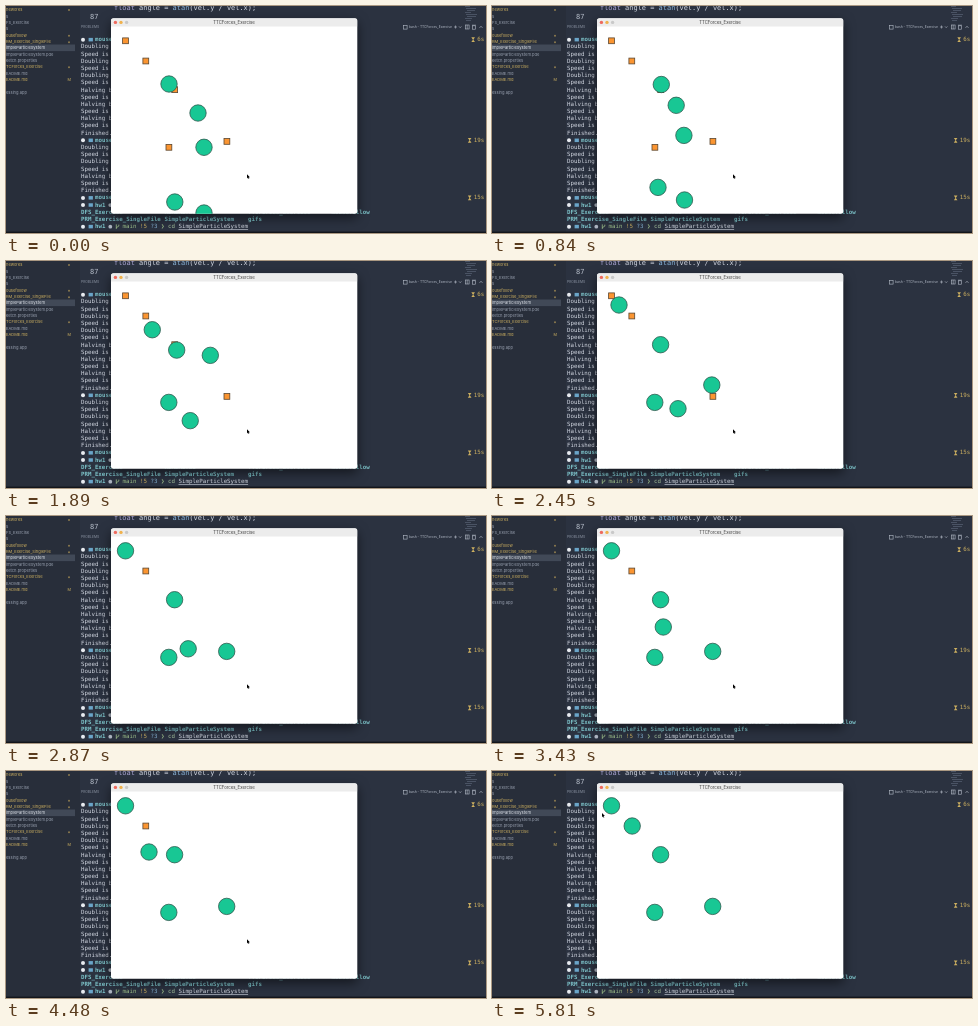
Write an HTML page with a canvas that moves like this. It is 480 by 227 pixels and loops after 5880 ms.

```html
<!DOCTYPE html>
<html lang="en">
<head>
<meta charset="utf-8">
<title>Particles</title>
<style>
html, body { margin: 0; width: 100%; height: 100%; overflow: hidden; background: #2b3240; }
canvas { display: block; width: 480px; height: 227px; }
</style>
</head>
<body>
<canvas id="stage" width="480" height="227"></canvas>
<script>
const W = 480, H = 227, LOOP = 5880, STEP = 70;
const MONO = '"DejaVu Sans Mono", monospace';
const SANS = 'Inter, "Open Sans", sans-serif';
const WIN = { x: 105, y: 12.3, w: 246.3, h: 195.4, bar: 8.2 };
const INK = '#d3d8e2', DIM = '#99a1b0', CYAN = '#7dc3c9', GOLD = '#cdb060';

const goals = [[119.5, 34.8], [139.8, 55], [168.7, 83.7], [162.9, 141.3], [220.9, 135.4]];

// Each path: [time, x, y]
const paths = [
  [[490, 163, 78], [840, 169.3, 78.5], [1400, 187, 74.4], [1820, 202, 91], [2450, 219.8, 124], [2800, 220.7, 135.4]],
  [[490, 192, 107], [840, 184.2, 99.3], [1400, 165, 88.5], [2450, 127, 44], [2800, 119.5, 34.8]],
  [[490, 198, 141.3], [840, 191.9, 129.4], [1400, 179.9, 110.5], [2150, 168.6, 83.7]],
  [[490, 168.8, 196], [840, 166, 181.4], [1400, 162, 154], [1750, 162.8, 141.4]],
  [[490, 198, 207], [840, 192.5, 194], [1400, 182.8, 170.6], [2450, 186, 147.7],
   [3430, 171.3, 111], [4480, 143, 81], [5200, 140.2, 55]]
];
const pointerPath = [[5460, 241, 168.3], [5810, 110, 42]];

const ctx = document.getElementById('stage').getContext('2d');

// Monotone cubic interpolation of one coordinate
function sample(path, axis, t) {
  const last = path.length - 1;
  if (t <= path[0][0]) return path[0][axis];
  if (t >= path[last][0]) return path[last][axis];
  let i = 0;
  while (t > path[i + 1][0]) i++;
  const rate = k => (path[k + 1][axis] - path[k][axis]) / (path[k + 1][0] - path[k][0]);
  const slope = k => {
    if (k === 0 || k === last) return 0;
    const a = rate(k - 1), b = rate(k);
    return a * b <= 0 ? 0 : 2 * a * b / (a + b);
  };
  const span = path[i + 1][0] - path[i][0];
  const u = (t - path[i][0]) / span, u2 = u * u, u3 = u2 * u;
  return path[i][axis] * (2 * u3 - 3 * u2 + 1) + path[i + 1][axis] * (3 * u2 - 2 * u3)
    + span * (slope(i) * (u3 - 2 * u2 + u) + slope(i + 1) * (u3 - u2));
}

function rect(x, y, w, h, color) {
  ctx.fillStyle = color;
  ctx.fillRect(x, y, w, h);
}

function dot(x, y, r, color) {
  ctx.fillStyle = color;
  ctx.beginPath();
  ctx.arc(x, y, r, 0, Math.PI * 2);
  ctx.fill();
}

function text(str, x, y, color, size = 5.78, family = MONO, weight = '') {
  ctx.font = `${weight} ${size}px ${family}`;
  ctx.fillStyle = color;
  ctx.fillText(str, x, y);
}

function line(points, color, width) {
  ctx.strokeStyle = color;
  ctx.lineWidth = width;
  ctx.beginPath();
  points.forEach(([x, y]) => ctx.lineTo(x, y));
  ctx.stroke();
}

function sidebar() {
  rect(0, 0, 74, H, '#282e3a');
  rect(0, 38.5, 69, 6.6, '#414957');
  const rows = [
    [4, 'neworks', GOLD], [10.3, 's', DIM], [16.7, 'FS_Exercise', DIM], [23, 's', DIM],
    [29.5, 'ousefollow', GOLD], [36, 'RM_Exercise_SingleFile', GOLD],
    [42, 'impleParticleSystem', '#e3e7ee'], [48.4, 'impleParticleSystem.pde', DIM],
    [54.8, 'ketch.properties', DIM], [61.2, 'TCForces_Exercise', GOLD],
    [67.6, 'EADME.md', DIM], [74, 'EADME.md', GOLD], [86.3, 'essing.app', DIM]
  ];
  rows.forEach(([y, str, color]) => text(str, 0, y, color, 4.05, SANS));
  [4, 29.8, 36.2, 61.2].forEach(y => dot(63, y, 1, '#8c7b4e'));
  text('M', 61.5, 74, GOLD, 3.8, SANS);
}

function editor() {
  text('87', 84, 11.6, '#b9c0cc', 6.95);
  text('float', 108, 1.8, '#a9a3d0', 6.95);
  text('angle =', 133.1, 1.8, INK, 6.95);
  text('atan', 166.6, 1.8, '#8ab4d8', 6.95);
  text('(vel.y / vel.x);', 183.3, 1.8, INK, 6.95);
  for (let i = 0; i < 8; i++) {
    rect(459 + i % 3, i * 2, 5 + (i * 5) % 7, 0.7, '#586274');
  }
  text('PROBLEMS', 75, 21.3, '#8b93a2', 3.35, SANS);

  ctx.strokeStyle = '#b5bcc8';
  ctx.lineWidth = 0.6;
  ctx.strokeRect(397.3, 19.3, 3.8, 3.8);
  ctx.strokeRect(459.3, 19, 3.8, 4);
  ctx.strokeRect(466.6, 19.8, 2.8, 3.4);
  line([[461.2, 19], [461.2, 23]], '#b5bcc8', 0.6);
  line([[466, 19.2], [470, 19.2]], '#b5bcc8', 0.6);
  line([[448, 21], [451, 21]], '#b5bcc8', 0.6);
  line([[449.5, 19.5], [449.5, 22.5]], '#b5bcc8', 0.6);
  line([[453, 20.4], [454.2, 21.7], [455.4, 20.4]], '#b5bcc8', 0.6);
  line([[473.5, 21.9], [475, 20.2], [476.5, 21.9]], '#b5bcc8', 0.6);
  text('bash - TTCForces_Exercise', 403, 21.3, '#b5bcc8', 3.3, SANS);
}

function prompt(y, dir) {
  dot(77, y, 2, '#e8ebf0');
  rect(82.6, y - 1.8, 4.3, 3.5, '#6aa5c9');
  text(dir, 89, y, CYAN, 5.78, MONO, 'bold');
}

function timer(y, label) {
  const x = 476.8 - label.length * 3.48 + 1.5;
  text(label, x, y, GOLD);
  ctx.fillStyle = GOLD;
  ctx.beginPath();
  [[-6, -2.4], [-2.4, -2.4], [-4, 0], [-2.4, 2.4], [-6, 2.4], [-4.4, 0]]
    .forEach(([dx, dy]) => ctx.lineTo(x + dx, y + dy));
  ctx.fill();
}

function gitPrompt(y) {
  prompt(y, 'hw1');
  dot(104.3, y, 1.9, '#aeb6c2');
  line([[110.3, y - 2.3], [110.3, y + 2.3]], '#9ebf8a', 0.8);
  line([[110.3, y + 1], [112.8, y - 0.5], [112.8, y - 2]], '#9ebf8a', 0.8);
  text('main', 116.5, y, '#9ebf8a');
  text('!5', 134, y, GOLD);
  text('?3', 144.5, y, '#83aed0');
  text('❯', 155, y, '#9ebf8a');
}

function terminal() {
  const pitch = 7.19, row = n => 33.7 + n * pitch;
  const words = { D: 'Doubling', S: 'Speed is', H: 'Halving b', F: 'Finished.' };
  const log = (codes, first) =>
    [...codes].forEach((c, i) => text(words[c], 75, row(first + i), INK));

  prompt(row(0), 'mousefollow');
  log('DSDSDSHSHSHSF', 1);
  prompt(row(14), 'mousefollow');
  log('DSDSHSF', 15);
  prompt(row(22), 'mousefollow');
  gitPrompt(row(23));

  const cell = (str, col, n) => text(str, 75 + col * 3.48, row(n), CYAN, 5.78, MONO, 'bold');
  cell('DFS_Exercise', 0, 24);
  cell('README.md', 24, 24);
  cell('TTCForces_Exercise', 48, 24);
  cell('mousefollow', 72, 24);
  cell('PRM_Exercise_SingleFile', 0, 25);
  cell('SimpleParticleSystem', 24, 25);
  cell('gifs', 48, 25);
  gitPrompt(row(26));
  text('cd', 162, row(26), '#a9c6a0');
  text('SimpleParticleSystem', 172.5, row(26), INK);
  rect(172.5, row(26) + 2.7, 69.6, 0.6, INK);

  timer(row(0), '6s');
  timer(row(14), '19s');
  timer(row(22), '15s');
  rect(0, 225.6, W, 1.4, '#12151b');
}

function windowShape() {
  ctx.beginPath();
  ctx.roundRect(WIN.x, WIN.y, WIN.w, WIN.h, 2.5);
}

function sketch(t) {
  ctx.save();
  ctx.shadowColor = 'rgba(0,0,0,.55)';
  ctx.shadowBlur = 12;
  ctx.shadowOffsetY = 4;
  ctx.fillStyle = '#fff';
  windowShape();
  ctx.fill();
  ctx.restore();

  ctx.save();
  windowShape();
  ctx.clip();
  rect(WIN.x, WIN.y, WIN.w, WIN.bar, '#ececec');
  ['#ee6a5f', '#f0b24e', '#c9c9c9'].forEach((c, i) => dot(109.4 + i * 5.6, 16.4, 1.7, c));
  ctx.textAlign = 'center';
  text('TTCForces_Exercise', 228, 16.6, '#3d3d3d', 4.3, SANS);
  ctx.textAlign = 'left';

  ctx.lineWidth = 0.8;
  ctx.strokeStyle = '#5a4630';
  ctx.fillStyle = '#fb9531';
  goals.forEach(([x, y]) => {
    ctx.fillRect(x - 2.9, y - 2.9, 5.8, 5.8);
    ctx.strokeRect(x - 2.9, y - 2.9, 5.8, 5.8);
  });
  ctx.strokeStyle = '#2f5a4e';
  paths.forEach(p => {
    dot(sample(p, 1, t), sample(p, 2, t), 8.2, '#18c794');
    ctx.stroke();
  });
  ctx.restore();
}

function pointer(t) {
  const x = sample(pointerPath, 1, t), y = sample(pointerPath, 2, t);
  ctx.beginPath();
  [[0, 0], [0, 4.2], [1, 3.3], [1.7, 4.8], [2.3, 4.5], [1.7, 3.1], [2.9, 3]]
    .forEach(([dx, dy]) => ctx.lineTo(x + dx, y + dy));
  ctx.closePath();
  ctx.strokeStyle = '#fff';
  ctx.lineWidth = 0.7;
  ctx.stroke();
  ctx.fillStyle = '#000';
  ctx.fill();
}

function draw(t) {
  ctx.textBaseline = 'middle';
  rect(0, 0, W, H, '#2b3240');
  sidebar();
  editor();
  terminal();
  sketch(t);
  pointer(t);
}

const start = performance.now();
function tick() {
  const t = (performance.now() - start) % LOOP;
  draw(Math.floor(t / STEP) * STEP);
  requestAnimationFrame(tick);
}
tick();
</script>
</body>
</html>
```
